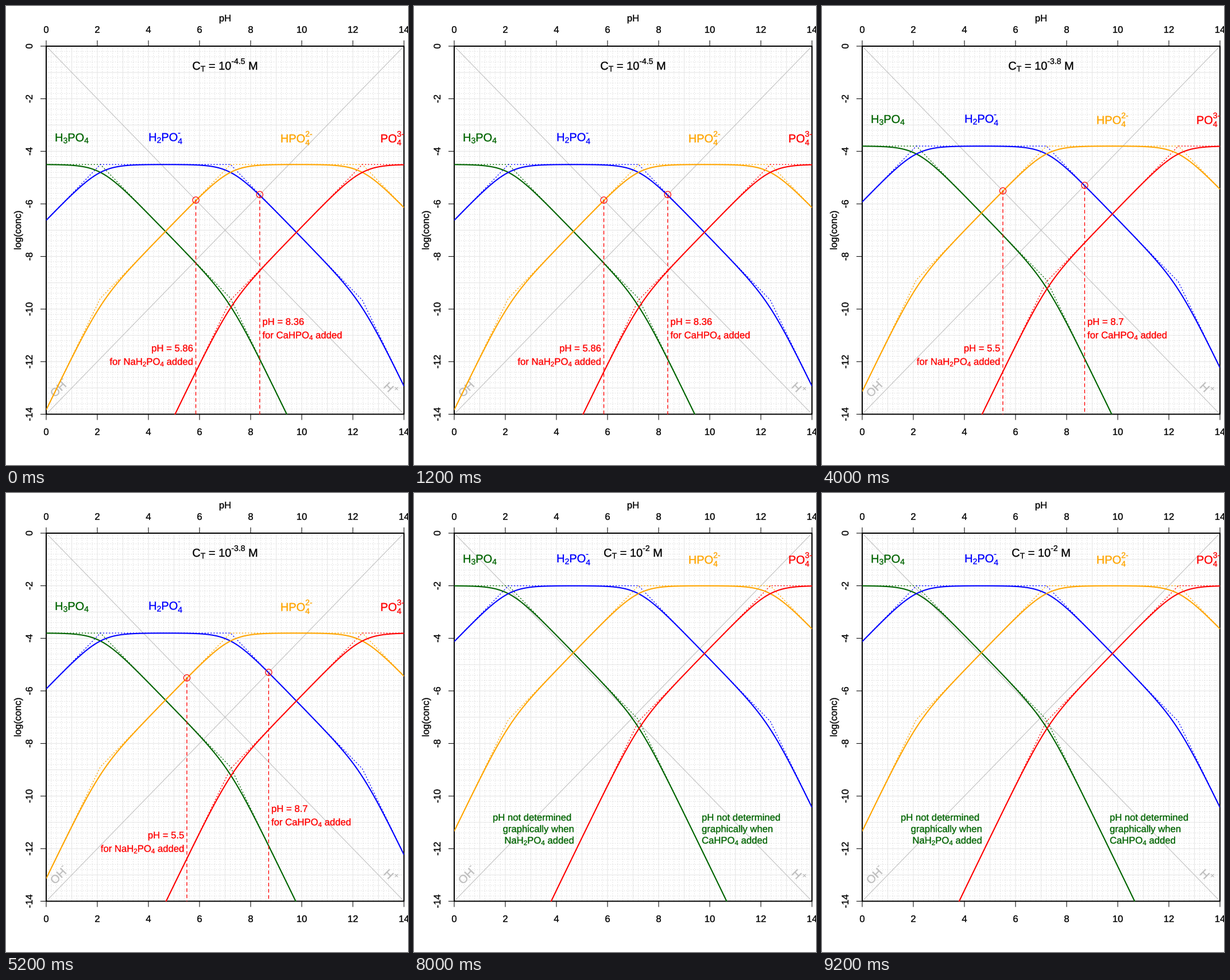
Recreate the animation shown at these times as a matplotlib script. Size 700 by 800 pixels, loop 10000 ms.

```python
import itertools

import matplotlib.pyplot as plt
import numpy as np
from matplotlib.animation import FuncAnimation
from matplotlib.patches import Circle, PathPatch, Rectangle
from matplotlib.path import Path
from matplotlib.textpath import TextPath
from matplotlib.transforms import Affine2D

plt.rcParams["path.snap"] = False

W, H, DPI = 700, 800, 100
L, R, T, B = 70, 693, 70, 711.5
PX = 72 / DPI
FONT = {"family": "Liberation Sans"}
SMALL, BIG = 100 / 6, 20
GRAY = "#bebebe"

PK = [2.12, 7.21, 12.37]
PK2 = PK[1]
SPECIES = [  # label, colour, label pH, baseline shift
    ("H_3|PO_4", "#006400", 1, 5.6),
    ("H_2|PO_4^-", "#0000ff", (PK[0] + PK[1]) / 2, 5),
    ("HPO_4^2-", "#ffa500", (PK[1] + PK[2]) / 2, 7.3),
    ("PO_4^3-", "#ff0000", 13.54, 7.3),
]
# log total concentration, pH with the sodium salt, pH with the calcium salt
CASES = [
    (-4.5, "5.86", "8.36"),
    (-4, "5.6", "8.6"),
    (-3.8, "5.5", "8.7"),
    (-3, None, "9.1"),
    (-2, None, None),
]
NA, CA = "NaH_2|PO_4| added", "CaHPO_4| added"

fig = plt.figure(figsize=(W / DPI, H / DPI), dpi=DPI, facecolor="white")
ax = fig.add_axes([0, 0, 1, 1])
ax.set_xlim(0, W)
ax.set_ylim(H, 0)
ax.axis("off")
clip = Rectangle((L, T), R - L, B - T, transform=ax.transData)
layer = itertools.count(1)


def X(ph):
    return L + np.asarray(ph) * (R - L) / 14


def Y(logc):
    return T - np.asarray(logc) * (B - T) / 14


def finish(artist, clipped):
    artist.set_zorder(next(layer))
    if clipped:
        artist.set_clip_path(clip)
    return artist


def line(xs, ys, color, width=1.04, dash=None, clipped=True):
    """Dash lengths are in line widths."""
    style = (0, dash) if dash else "-"
    art, = ax.plot(xs, ys, color=color, lw=width * PX, ls=style,
                   solid_capstyle="butt", dash_capstyle="round",
                   scalex=False, scaley=False)
    return finish(art, clipped)


def advance(s, size):
    def right(t):
        return TextPath((0, 0), t, size=size, prop=FONT).get_extents().x1
    return right(s + "|") - right("|")


def layout(markup, size):
    """Glyph outlines and width; _ starts a subscript, ^ a superscript."""
    chunks = markup.replace("_", "|_").replace("^", "|^").split("|")
    paths, x, start = [], 0, 0
    for prev, chunk, nxt in zip([""] + chunks, chunks, chunks[1:] + [""]):
        em, rise, s = size, 0, chunk
        stacked = chunk[:1] == "^" and prev[:1] == "_"
        if chunk[:1] == "_":
            em, s = 0.7 * size, chunk[1:]
            rise = -size * (0.25 if nxt[:1] == "^" else 0.16)
        elif chunk[:1] == "^":
            em, s, rise = 0.7 * size, chunk[1:], 0.5 * size
        start = start if stacked else x
        paths.append(TextPath((start, rise), s, size=em, prop=FONT))
        x = max(x, start + advance(s, em))
    return Path.make_compound_path(*paths), x


def text(x, y, markup, color="black", size=SMALL, ha=0.5, rot=0, up=0,
         clipped=False):
    path, width = layout(markup, size)
    place = (Affine2D().translate(-ha * width, -up).rotate_deg(rot)
             .scale(1, -1).translate(x, y))
    art = PathPatch(path.transformed(place), fc=color, ec=color, lw=0.35 * PX)
    ax.add_patch(art)
    return finish(art, clipped)


def draw_base():
    for v in np.arange(71) / 5:
        major = abs(v - round(v)) < 0.01
        style = dict(color="#e5e5e5") if major else dict(
            color="#d3d3d3", width=0.8, dash=(1.2, 3.8))
        line([X(v)] * 2, [T, B], **style)
        line([L, R], [Y(-v)] * 2, **style)
    line([L, R], [T, B], GRAY)
    line([L, R], [B, T], GRAY)
    text(X(0.5), Y(-13), "OH^-", GRAY, BIG, rot=45, up=7.2, clipped=True)
    text(X(13.5), Y(-13), "H^+", GRAY, BIG, rot=-45, up=9, clipped=True)

    line([L, R, R, L, L, R], [T, T, B, B, T, T], "black", 2, clipped=False)
    for v in range(0, 15, 2):
        x, y = X(v), Y(-v)
        line([x, x], [T, T - 10], "black", clipped=False)
        line([x, x], [B, B + 10], "black", clipped=False)
        line([L, L - 10], [y, y], "black", clipped=False)
        text(x, 46.8, str(v))
        text(x, 747.8, str(v))
        text(46, y, str(-v), rot=90)
    text((L + R) / 2, 26.8, "pH")
    text(26, (T + B) / 2, "log(conc)", rot=90)


def marker(ph, logc, label, salt, y, side):
    """Circled crossing with a drop line; side is -1 for left, 1 for right."""
    red, x = "#ff0000", X(ph)
    ring = Circle((x, Y(logc)), 5.6, fill=False, ec=red, lw=1.2 * PX)
    ax.add_patch(ring)
    ha = (1 - side) / 2
    return [
        line([x, x], [Y(logc), B], red, 1.35, dash=(4, 4)),
        finish(ring, True),
        text(x + 4.63 * side, y, "pH = " + label, red, ha=ha),
        text(x + 4.63 * side, y + 23.4, "for " + salt, red, ha=ha),
    ]


def no_answer(x, salt, ha):
    rows = ["pH not determined ", "graphically when", salt]
    return [text(x, 571 + 20 * k, row, "#006400", ha=ha)
            for k, row in enumerate(rows)]


def draw_case(c, na_ph, ca_ph):
    ph = np.linspace(0, 14, 1401)
    terms = np.array([k * ph - sum(PK[:k]) for k in range(4)])
    exact = c + terms - np.log10((10 ** terms).sum(axis=0))
    limit = c + terms - terms.max(axis=0)

    arts = []
    for (_, color, _, _), ys in zip(SPECIES, limit):
        arts.append(line(X(ph), Y(ys), color, 1.3, dash=(1, 3)))
    for (_, color, _, _), ys in zip(SPECIES, exact):
        arts.append(line(X(ph), Y(ys), color, 2.08))
    for label, color, at, shift in SPECIES:
        arts.append(text(X(at), Y(c + 1) + shift, label, color, BIG,
                         clipped=True))
    arts.append(text((L + R) / 2, 111, f"C_T| = 10^{c:g}| M", size=BIG))

    if na_ph:
        cross = (PK2 - c) / 2
        arts += marker(cross, -cross, na_ph, NA, 602, -1)
    else:
        arts += no_answer(301.2 if ca_ph else 278.8, NA, 1)
    if ca_ph:
        cross = (14 + c + PK2) / 2
        arts += marker(cross, cross - 14, ca_ph, CA, 555.8, 1)
    else:
        arts += no_answer(501, CA, 0)
    return arts


draw_base()
scenes = [draw_case(*case) for case in CASES]


def show(i):
    for k, scene in enumerate(scenes):
        for art in scene:
            art.set_visible(k == i)
    return scenes[i]


anim = FuncAnimation(fig, show, frames=len(CASES), interval=2000,
                     repeat=True, repeat_delay=0, blit=False)
plt.show()
```
